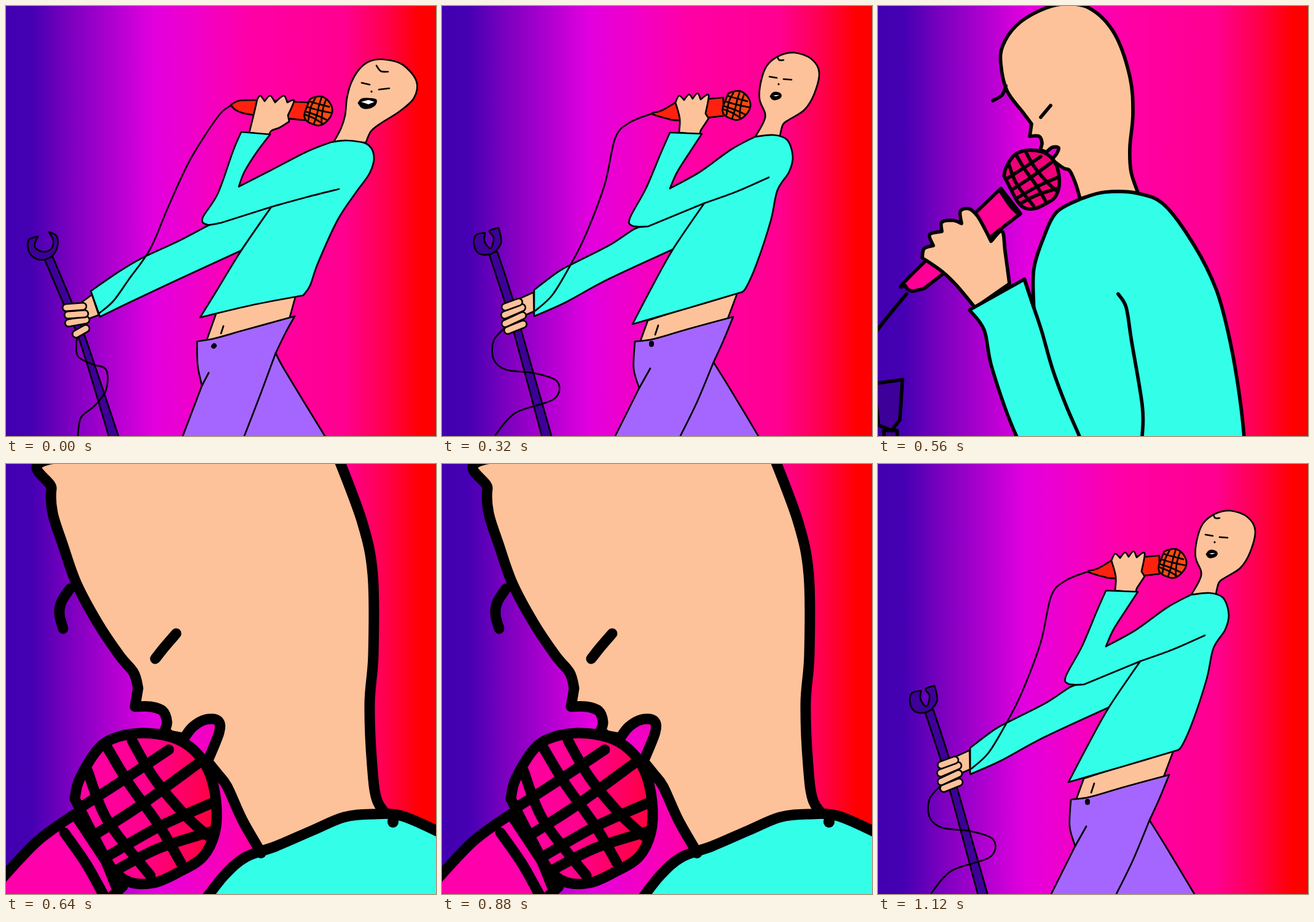
These frames come from a looping animation (700 px wide and 700 px high, 1280 ms). An HTML page with a canvas:

```html
<!DOCTYPE html>
<html lang="en">
<head>
<meta charset="utf-8">
<title>Singer</title>
<style>
html, body { margin: 0; width: 100%; height: 100%; overflow: hidden; background: #e0d; }
canvas { display: block; width: 100vw; height: 100vh; }
</style>
</head>
<body>
<canvas id="stage" width="700" height="700"></canvas>
<script>
const ctx = document.getElementById('stage').getContext('2d');
const SKIN = '#fec29a', SHIRT = '#33ffe9', JEANS = '#a566ff', STAND = '#3d0099';
const RED = '#ff2110', ORANGE = '#fa4b10', PINK = '#ff0096', INK = '#000';

const backdrop = ctx.createLinearGradient(0, 0, 700, 0);
[[0, '#4200b0'], [40, '#4400b2'], [100, '#7800be'], [180, '#b400d2'], [240, '#e200de'],
 [300, '#ee00cc'], [400, '#ff00a6'], [550, '#ff0090'], [620, '#ff004b'], [675, '#ff0000'], [700, '#ff0000']]
  .forEach(([x, color]) => backdrop.addColorStop(x / 700, color));

// A path is a list of smooth runs; "|" marks a sharp corner.
const parse = text => text.split('|').map(run => {
  const n = run.trim().split(/\s+/).map(Number);
  return Array.from({ length: n.length / 2 }, (_, i) => [n[2 * i], n[2 * i + 1]]);
});

const mix = (a, b, t, warp = p => p) => {
  const to = parse(b);
  return parse(a).map((run, i) => run.map(([x, y], j) =>
    warp([x + (to[i][j][0] - x) * t, y + (to[i][j][1] - y) * t])));
};

function trace(spec) {
  const runs = typeof spec === 'string' ? parse(spec) : spec;
  let last;
  ctx.beginPath();
  for (const run of runs) {
    const pts = last ? [last, ...run] : run;
    if (!last) ctx.moveTo(...pts[0]);
    for (let i = 0; i + 1 < pts.length; i++) {
      const b = pts[i], c = pts[i + 1], a = pts[i - 1] || b, d = pts[i + 2] || c;
      ctx.bezierCurveTo(b[0] + (c[0] - a[0]) / 6, b[1] + (c[1] - a[1]) / 6,
        c[0] - (d[0] - b[0]) / 6, c[1] - (d[1] - b[1]) / 6, c[0], c[1]);
    }
    last = pts[pts.length - 1];
  }
}

function stroke(width, color = INK) {
  ctx.lineWidth = width;
  ctx.strokeStyle = color;
  ctx.stroke();
}

function micHead(fill, width) {
  trace('112 545 119 515 145 470 172 448 220 438 270 445 305 465 330 500 342 550 340 600 320 640 280 665 240 682 200 680 170 655 140 600 112 545');
  ctx.fillStyle = fill;
  ctx.fill();
  stroke(width);
  ['133 500 165 580 235 670', '165 462 200 520 250 590 285 650', '205 450 240 510 290 570 328 605',
   '120 560 190 515 265 465', '150 600 220 555 312 488', '168 637 250 590 335 552', '185 658 250 625 335 598']
    .forEach(line => { trace(line); stroke(width); });
}

const tools = {
  shape(spec, fill, width) {
    trace(spec);
    ctx.closePath();
    ctx.fillStyle = fill;
    ctx.fill();
    stroke(width);
  },
  line(spec, fill, width) { trace(spec); stroke(width); },
  sleeve(spec, fill, width) {
    trace(spec);
    ctx.fillStyle = fill;
    ctx.fill();
    stroke(width);
  },
  blob(spec, fill) { trace(spec); ctx.fillStyle = fill; ctx.fill(); },
  dot(spec, size) { trace(spec); stroke(size); },
  finger(spec, fill, width) { trace(spec); stroke(9 + 2 * width); stroke(9, fill); },
  mic(spec, fill, width) {
    const [x, y] = spec[0][0], scale = 0.195;
    ctx.save();
    ctx.translate(x, y);
    ctx.rotate(0.85);
    ctx.scale(scale, scale);
    ctx.translate(-227, -562);
    micHead(fill, width / scale);
    ctx.restore();
  }
};

const paint = (parts, width) => parts.forEach(([tool, fill, spec]) => tools[tool](spec, fill, width));

// Each part: tool, fill, leaning far back, leaning less.
const LEAN = [
  ['shape', STAND, '61 408 | 95 488 120 545 169 706 | 185 706 | 131 545 107 482 75 406', '76 402 | 100 475 118 535 164 706 | 180 706 | 131 535 113 470 90 400'],
  ['shape', STAND, '52 375 | 37 381 37 399 48 411 62 413 76 406 84 390 82 374 70 368 | 77 382 73 396 60 400 48 394 47 386 52 375', '70 369 | 55 373 52 388 59 402 74 405 86 400 96 386 95 372 92 361 | 77 366 84 377 80 394 73 390 69 381 70 369'],
  ['line', 0, '122 525 115 545 117 570 140 583 163 592 163 625 145 650 122 670 117 700', '104 522 84 545 84 575 104 592 152 598 188 612 182 640 120 662 87 698'],
  ['shape', SKIN, '140 470 | 122 483 | 118 500 | 135 509 | 151 503', '149 466 | 116 481 | 115 500 | 136 503 | 150 497'],
  ['finger', SKIN, '114 534 130 525', '107 528 132 518'],
  ['finger', SKIN, '102 516 130 511', '103 517 131 504'],
  ['finger', SKIN, '101 503 128 501', '102 503 130 491'],
  ['finger', SKIN, '98 491 125 489', '103 490 125 482'],
  ['shape', SHIRT, '345 352 | 330 357 280 383 220 411 180 435 138 464 | 153 506 | 200 483 270 450 383 398 | 432 327', '330 359 | 313 363 275 388 218 417 190 432 150 462 | 150 505 | 200 483 270 445 376 396 | 427 321'],
  ['line', 0, '366 162 345 180 300 250 265 325 235 395 200 445 175 480 152 500', '342 175 305 190 282 215 265 290 235 370 210 420 180 470 152 496'],
  ['shape', SKIN, '343 498 | 326 546 | 461 510 | 472 470', '335 512 | 322 548 | 464 512 | 482 464'],
  ['line', 0, '354 521 350 533', '352 520 347 535'],
  ['shape', JEANS, '311 546 | 340 541 390 527 470 505 | 455 532 439 565 | 455 595 519 700 | 522 710 | 284 710 | 319 618 | 312 585 311 546', '314 546 | 345 542 400 526 474 506 | 458 545 442 580 | 470 625 515 700 | 520 710 | 277 710 | 321 622 | 312 590 314 546'],
  ['line', 0, '330 597 319 618', '339 590 321 622'],
  ['line', 0, '439 565 415 630 388 700', '442 580 415 645 388 700'],
  ['dot', 8, '338 554 339 553', '341 549 341 551'],
  ['shape', SKIN, '533 222 545 200 552 178 555 150 562 125 575 103 592 90 615 87 645 95 668 122 664 150 640 172 610 191 594 204 586 222', '510 213 523 190 526 175 517 152 519 124 529 97 549 81 574 76 601 86 614 108 606 143 590 169 565 185 555 193 550 212'],
  ['line', 0, '603 97 610 106 622 107', '546 83 549 88 556 88'],
  ['line', 0, '579 125 592 128', '533 115 545 117'],
  ['line', 0, '607 136 624 134', '556 119 569 120'],
  ['dot', 3, '595 139 595 139.5', '548 127 548 127.5'],
  ['shape', INK, '574 158 579 152 590 151 602 153 600 161 590 166 580 165 574 158', '535 147 539 142 545 141 551 144 550 149 543 152 538 151 535 147'],
  ['blob', '#fff', '578 156 | 590 153 | 600 156 | 590 160', '539 146 | 543 145 | 549 145 | 544 147'],
  ['shape', RED, '366 161 380 154 408 153 | 492 157 | 487 186 | 400 177 375 170 366 161', '342 174 358 170 382 156 | 458 149 | 458 179 | 388 186 365 183 342 176'],
  ['mic', ORANGE, '507 171', '478 162'],
  ['shape', SKIN, '396 206 403 178 409 152 | 414 146 421 155 | 430 146 438 157 | 452 146 458 157 | 469 154 459 178 | 461 188 | 445 198 432 203 428 210', '386 206 387 183 380 157 | 386 146 394 153 | 402 144 408 151 | 416 142 421 152 | 434 145 429 175 | 434 183 | 426 195 421 203 420 209'],
  ['shape', SHIRT, '528 222 490 237 430 268 379 294 | 388 270 408 238 430 209 | 383 205 | 370 235 345 305 320 345 328 356 350 353 | 432 327 | 383 398 345 460 316 507 | 400 487 484 471 | 495 455 508 418 540 348 570 303 592 272 599 245 588 225 555 219 528 222', '509 213 470 234 420 270 371 297 | 383 270 404 237 423 208 | 371 206 | 356 240 332 297 306 345 310 358 335 359 | 427 321 | 376 396 342 457 310 518 | 400 492 484 467 | 494 460 512 420 535 350 546 300 565 270 571 245 562 218 540 210 509 213'],
  ['line', 0, '432 327 490 311 542 298', '427 321 480 302 532 279']
];

const SIDE_BODY = [
  ['shape', STAND, '162 384 | 166 460 171 540 176 600 177 706 | 189 706 | 187 600 183 530 176 460 172 384'],
  ['shape', STAND, '155 349 | 176 346 | 174 376 | 168 384 | 158 380'],
  ['line', 0, '179 282 158 308 120 360 85 415 75 455 85 495 105 530 140 553 172 571'],
  ['line', 0, '189 587 205 598 212 622 198 650 160 662 120 672 95 700'],
  ['shape', SKIN, '206 453 | 188 462 | 182 485 | 190 492 | 208 480'],
  ['finger', SKIN, '166 507 183 505'],
  ['finger', SKIN, '160 492 183 491'],
  ['finger', SKIN, '159 480 182 479'],
  ['finger', SKIN, '161 467 180 466'],
  ['shape', SHIRT, '290 434 | 255 441 205 446 | 211 494 | 255 485 302 479'],
  ['shape', SHIRT, '320 497 305 500 299 515 303 526 318 527 | 318 500'],
  ['shape', SKIN, '318 498 | 322 546 | 437 534 | 433 515'],
  ['line', 0, '334 521 337 540'],
  ['shape', JEANS, '304 548 | 340 542 400 534 452 530 | 450 560 442 588 | 475 635 518 700 | 523 710 | 276 710 | 322 618 | 312 590 304 548'],
  ['line', 0, '336 592 322 618'],
  ['line', 0, '442 588 415 650 392 700'],
  ['dot', 7, '333 552 333 554']
];

const SIDE_SHIRT = [
  ['shape', SHIRT, '309 211 | 327 206 352 207 372 216 394 246 410 278 419 310 426 347 431 388 434 450 441 490 453 521 | 425 515 390 506 350 498 | 318 496 | 305 500 299 512 | 302 478 300 440 | 280 400 274 340 274 292 | 274 264 281 241 291 221 309 211'],
  ['sleeve', SHIRT, '274 292 | 267 271 | 226 294 | 237 309 243 338 261 388 285 430 300 445 325 452 345 441 352 420 355 388 355 365 347 317 343 292 337 282'],
  ['line', 0, '267 271 274 292 280 310 288 338 298 365 308 388 312 399']
];

const SIDE_HEAD = [
  ['shape', SKIN, '424 306 412 270 410 230 415 175 410 115 385 45 345 4 300 -3 262 8 225 32 203 65 200 95 210 138 235 172 250 192 | 247 212 | 262 212 267 223 264 234 | 274 238 | 284 230 294 231 291 240 283 250 | 302 264 312 268 322 290 329 314'],
  ['line', 0, '265 181 281 162'],
  ['line', 0, '208 130 202 145 187 154'],
  ['shape', PINK, '200 297 | 50 442 45 456 55 464 75 460 | 232 338']
];

const SIDE_HAND = [
  ['line', 0, '198 300 215 325 230 340'],
  ['shape', SKIN, '158 491 128 455 104 432 72 410 | 75 395 90 390 | 84 372 104 367 | 104 352 122 349 136 354 | 134 334 148 330 162 342 175 365 184 383 | 202 367 207 400 214 452']
];

// Halfway turn: the torso swings upright while the stand comes in.
function swing([x, y]) {
  const inner = Math.min(1, Math.max(0, (x - 150) / 250));
  const stand = y < 500 ? 45 : 45 * Math.max(0, 700 - y) / 200;
  const torso = -0.33 * Math.max(0, 520 - y);
  return [x + stand * (1 - inner) + torso * inner, y];
}

const lean = (t, warp) => () =>
  paint(LEAN.map(([tool, fill, a, b]) => [tool, fill, mix(a, b, t, warp)]), 2.7);

const side = zoom => () => {
  const k = 1 / 2.18, detail = 2.6 / k;
  ctx.save();
  if (zoom) {
    ctx.scale(2.18, 2.18);
    ctx.translate(-157.7, -67);
  }
  paint(SIDE_BODY, 2.6);
  ctx.save();
  ctx.translate(157.7, 67);
  ctx.scale(k, k);
  paint(SIDE_HEAD, detail);
  ctx.save();
  ctx.translate(250, 283);
  ctx.scale(0.39, 0.39);
  ctx.translate(-227, -562);
  micHead('#f00078', detail / 0.39);
  ctx.restore();
  paint(SIDE_HAND, detail);
  ctx.restore();
  paint(SIDE_SHIRT, 2.6);
  ctx.restore();
};

const micGlow = ctx.createLinearGradient(110, 560, 345, 590);
micGlow.addColorStop(0, '#ff00a8');
micGlow.addColorStop(0.5, '#ff008c');
micGlow.addColorStop(1, '#ff0038');

const closeUp = t => () => {
  const face = mouth => '632 582 605 550 596 490 592 390 598 310 597 180 580 95 541 -10 | 88 -10 74 40 76 80 92 130 115 195 150 260 185 312 208 340 215 365 | 210 395 | 235 395 255 402 262 420 258 435 | 268 442 | 290 446 | '
    + mouth + ' 328 484 | 345 505 360 525 385 580 415 632';
  paint([
    ['shape', SKIN, mix(face('304 428 325 416 345 418 347 437'), face('302 431 318 424 340 430 342 447'), t)],
    ['line', 0, mix('243 317 258 298 277 276', '248 328 269 311 293 300', t)],
    ['line', 0, '104 203 90 225 87 245 93 268'],
    ['shape', SHIRT, '320 715 | 355 670 390 640 440 622 500 596 550 575 595 570 645 573 715 604 | 715 715'],
    ['dot', 18, '415 632 415 633'],
    ['dot', 18, '630 582 630 583'],
    ['shape', '#ff00aa', '-15 684 | 50 615 112 570 | 190 688 | 160 715 | -15 715']
  ], 17);
  micHead(micGlow, 17);
  paint([
    ['line', 0, '95 600 130 650 158 700'],
    ['line', 0, '115 575 150 620 180 690']
  ], 17);
};

// Each shot holds until its end time in ms.
const SHOTS = [
  [160, lean(0)], [320, lean(-0.2)], [400, lean(1)], [480, lean(1, swing)],
  [560, side(false)], [640, side(true)],
  [720, closeUp(0)], [800, closeUp(0.5)], [880, closeUp(1)], [960, closeUp(0)],
  [1040, side(true)], [1120, side(false)], [1280, lean(1)]
];

ctx.lineCap = ctx.lineJoin = 'round';
const start = performance.now();

function frame(now) {
  const time = Math.max(0, now - start) % 1280;
  ctx.fillStyle = backdrop;
  ctx.fillRect(0, 0, 700, 700);
  SHOTS.find(([end]) => time < end)[1]();
  requestAnimationFrame(frame);
}
frame(start);
</script>
</body>
</html>
```
